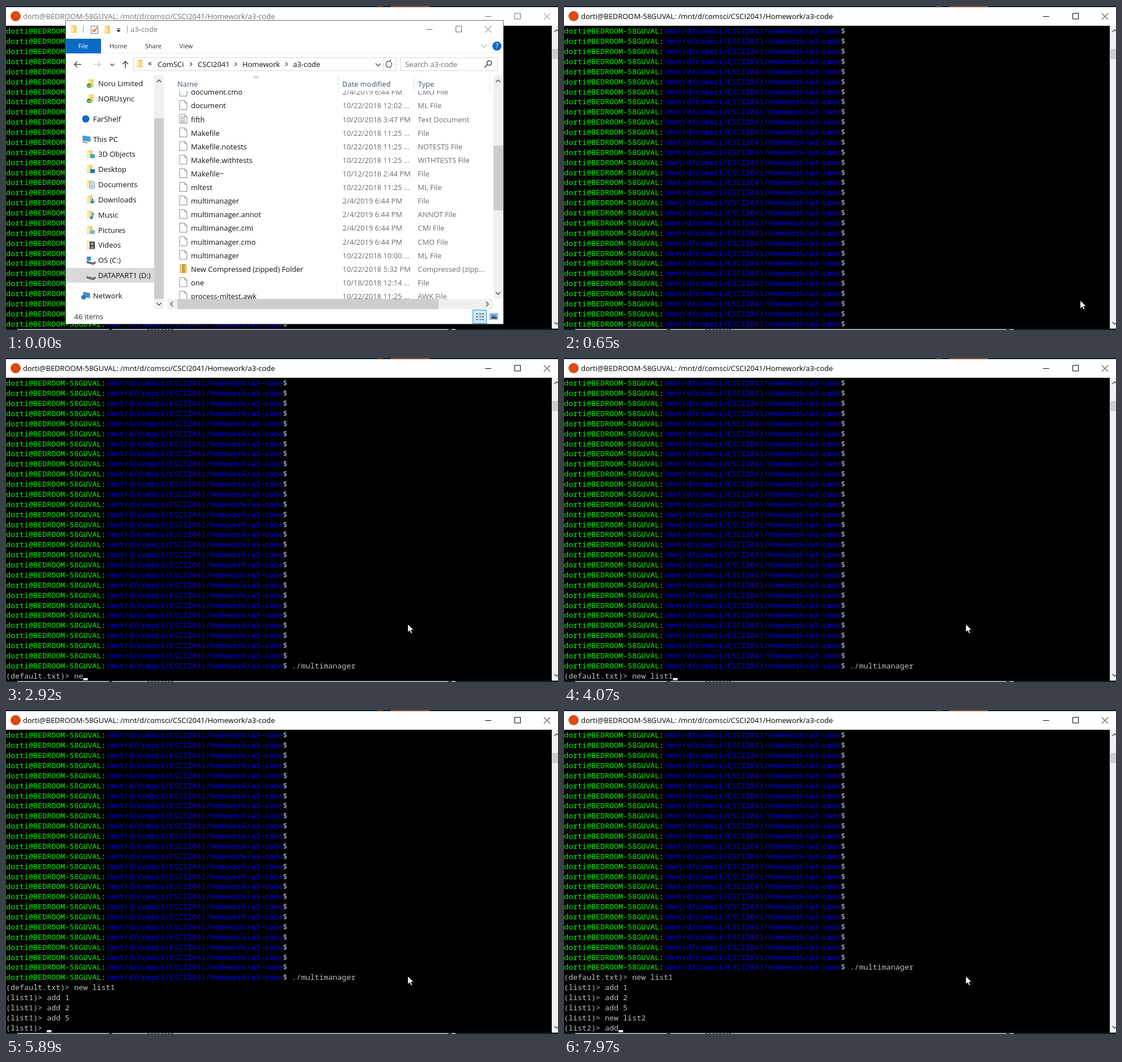
Write an HTML page that moves like this. It is 976 px wide and 574 px high and loops after 8000 ms.

```html
<!DOCTYPE html>
<html lang="en">
<head>
<meta charset="utf-8">
<title>Terminal session</title>
<style>
  html, body { margin: 0; width: 100%; height: 100%; overflow: hidden; background: #000; }
  svg { display: block; width: 100vw; height: 100vh; }
  text { font: 12.95px "Open Sans", "Noto Sans", sans-serif; white-space: pre; }
  #term text { font: 13.38px "Noto Sans Mono", "DejaVu Sans Mono", monospace; fill: #c0c0c0; }
  .user { fill: #0f0; }
  .path { fill: #00f; }
</style>
</head>
<body>
<svg id="stage" viewBox="0 0 976 574" preserveAspectRatio="none"></svg>
<script>
const LOOP = 8000;
const ROWS = 30, ROW_H = 17.87, COL_W = 8.03;
const USER = 'dorti@BEDROOM-58GUVAL';
const PATH = '/mnt/d/comsci/CSCI2041/Homework/a3-code';
const GRAY = '#6d6d6d';

// ---- drawing helpers ----
const rect = (x, y, w, h, fill, stroke = 'none') =>
  `<rect x="${x}" y="${y}" width="${w}" height="${h}" fill="${fill}" stroke="${stroke}"/>`;
const circle = (x, y, r, fill) => `<circle cx="${x}" cy="${y}" r="${r}" fill="${fill}"/>`;
const line = (d, stroke = '#444', width = 1, fill = 'none') =>
  `<path d="${d}" stroke="${stroke}" stroke-width="${width}" fill="${fill}"/>`;
const label = (x, mid, s, fill = '#111', size = 12.95, anchor = 'start') =>
  `<text x="${x}" y="${mid + size * 0.36}" fill="${fill}" text-anchor="${anchor}" style="font-size:${size}px">${s}</text>`;
const chevron = (x, y, dir, r = 4, color = '#505050', width = 1.5) =>
  `<g transform="translate(${x} ${y}) rotate(${{ up: 0, right: 90, down: 180, left: 270 }[dir]})">` +
  line(`M${-r} ${r / 2}L0 ${-r / 2}L${r} ${r / 2}`, color, width) + '</g>';
const buttons = (x, y, color) =>
  line(`M${x} ${y + .5}h11`, color) + rect(x + 52.5, y - 5, 10, 10, 'none', color) +
  line(`M${x + 104} ${y - 5}l11 11m0 -11l-11 11`, color);
const folder = (x, y) =>
  rect(x - 5, y - 7, 10, 14, '#f6d06f') + line(`M${x - 5} ${y - 7}l5 3v11l-5 -2z`, 'none', 0, '#ffe9a2');
const page = (x, y) =>
  line(`M${x - 6} ${y - 8}h9l4 4v12h-13zM${x + 3} ${y - 8}v4h4`, '#858585', 1, '#fff');

// ---- sidebar icons ----
const icons = {
  synced: (x, y) => folder(x, y) + circle(x - 3, y + 4, 4, '#3a9a2c') + line(`M${x - 5} ${y + 4}l2 2l3 -4`, '#fff'),
  dot: (x, y) => circle(x, y, 6.5, '#1268c8'),
  pc: (x, y) => line(`M${x - 5} ${y - 6}l13 2v8l-13 -2z`, '#5b7c96', 1, '#3aa5e8') + line(`M${x - 6} ${y + 4}l9 3`, '#8ba0ad', 2),
  accent: color => (x, y) => folder(x - 2, y) + rect(x - 1, y, 8, 7, color),
  drive: (x, y) => line(`M${x - 7} ${y + 2}l11 3l4 -2v3l-4 2l-11 -3z`, '#555', 1, '#777'),
  system: (x, y) => rect(x - 7, y - 6, 7, 7, '#2492dc') + icons.drive(x, y),
  doc: (x, y) => folder(x - 2, y) + rect(x - 1.5, y - 4, 8, 11, '#fff', '#6c8ba5') + line(`M${x} ${y - 1}h5m-5 3h5m-5 2h5`, '#3a87c8'),
  music: (x, y) => folder(x - 2, y) + circle(x + 1, y + 5, 2.5, '#1a86d8') + line(`M${x + 3} ${y + 5}v-8l3 3`, '#1a86d8', 1.5),
  down: (x, y) => folder(x - 2, y) + line(`M${x + 3} ${y - 2}v8m-3.500 -3.500l3.500 3.500l3.500 -3.500`, '#1a78d0', 2),
  film: (x, y) => folder(x - 2, y) + rect(x - 2, y - 6, 9, 13, '#3c3c3c') + rect(x, y - 4, 5, 4, '#8ab') + rect(x, y + 2, 5, 4, '#b87'),
  net: (x, y) => line(`M${x - 4} ${y - 6}l11 2v8l-11 -2z`, '#567', 1, '#3798dd') + circle(x - 4, y + 3, 4, '#3977b8')
};

const sidebar = [
  [137, 'Noru Limited', icons.synced, 1], [164, 'NORUsync', icons.synced, 1],
  [200, 'FarShelf', icons.dot, 0], [236, 'This PC', icons.pc, 0],
  [262.5, '3D Objects', icons.accent('#35a7d8'), 1], [289, 'Desktop', icons.accent('#1976c9'), 1],
  [316, 'Documents', icons.doc, 1], [343, 'Downloads', icons.down, 1],
  [370, 'Music', icons.music, 1], [397, 'Pictures', icons.accent('#7eb6d9'), 1],
  [423.5, 'Videos', icons.film, 1], [450, 'OS (C:)', icons.system, 1],
  [477, 'DATAPART1 (D:)', icons.drive, 1], [513, 'Network', icons.net, 0]
];

const BUILT = '2/4/2019 6:44 PM', EDITED = '10/22/2018 11:25 ...';
const files = [
  ['document.cmo', BUILT, 'CMO File'],
  ['document', '10/22/2018 12:02 ...', 'ML File'],
  ['fifth', '10/20/2018 3:47 PM', 'Text Document'],
  ['Makefile', EDITED, 'File'],
  ['Makefile.notests', EDITED, 'NOTESTS File'],
  ['Makefile.withtests', EDITED, 'WITHTESTS File'],
  ['Makefile~', '10/12/2018 2:44 PM', 'File'],
  ['mltest', EDITED, 'ML File'],
  ['multimanager', BUILT, 'File'],
  ['multimanager.annot', BUILT, 'ANNOT File'],
  ['multimanager.cmi', BUILT, 'CMI File'],
  ['multimanager.cmo', BUILT, 'CMO File'],
  ['multimanager', '10/22/2018 10:00 ...', 'ML File'],
  ['New Compressed (zipped) Folder', '10/22/2018 5:32 PM', 'Compressed (zipp...'],
  ['one', '10/18/2018 12:14 ...', 'File'],
  ['process-mltest.awk', EDITED, 'AWK File']
];

function fileRow([name, date, type], i) {
  const y = 152.6 + 24.12 * i;
  let icon = page(313, y - 1);
  if (type === 'Text Document') icon += line(`M309 ${y - 4}h8m-8 3h8m-8 3h8m-8 3h8`, '#777');
  if (type.startsWith('Compressed')) {
    icon = rect(307, y - 9, 13, 16, '#f3ca60') + rect(312, y - 9, 4, 16, '#9b8550') +
      line(`M314 ${y - 9}v16`, '#eee', 2).replace('/>', ' stroke-dasharray="1 2"/>');
  }
  return icon + label(327, y, name) + label(595, y, date, GRAY) + label(728, y, type, GRAY);
}

function explorer() {
  const crumbs = [[268, 'ComSCi'], [339, 'CSCI2041'], [418, 'Homework'], [507.5, 'a3-code']];
  return rect(105.5, 25.5, 774, 538, '#fff', '#6e6e6e') +
    // title bar and ribbon
    folder(120, 41) + line('M136.500 35v13M214.500 35v13', '#999') +
    rect(150.5, 35.5, 12, 13, '#fff', '#777') + line('M153 42l3 3l5 -7', '#d8562a', 2) +
    folder(179, 42) + line('M196 40.500h6M196 43l3 3l3 -3z', '#222', 1, '#222') +
    label(220, 41.5, 'a3-code', '#777') + buttons(743, 41, '#666') +
    rect(106, 58, 62, 26, '#0c6ac6') + label(136.5, 71, 'File', '#fff', 11, 'middle') +
    [[198.5, 'Home'], [260.5, 'Share'], [318.5, 'View']].map(([x, s]) => label(x, 71, s, '#333', 11, 'middle')).join('') +
    chevron(845, 71, 'down', 5, '#888', 1) + circle(868, 71, 8, '#0c6ac6') +
    label(868, 71, '?', '#fff', 12, 'middle') + line('M168 83.500h711', '#ececec') +
    // navigation row
    line('M133 103.500h-12m5 -5l-5 5l5 5', '#444', 1.5) + line('M155 103.500h12m-5 -5l5 5l-5 5', '#ccc', 1.5) +
    chevron(188, 104, 'down', 3.5) + line('M211 110v-12m-5 5l5 -5l5 5', '#444', 1.5) +
    rect(225.5, 91.5, 464, 23, '#fff', '#d9d9d9') + folder(236, 102) + label(251, 101, '«', '#222', 14) +
    crumbs.map(([x, s]) => label(x, 103, s)).join('') +
    [327, 406, 496].map(x => chevron(x, 103, 'right', 3.5, '#444', 1.2)).join('') +
    chevron(658, 104, 'down', 4.5) + line('M667.500 92v23', '#d9d9d9') +
    line('M681 100a5 5.500 0 1 1 -5 -2h4m0 -3v4', '#555', 1.4) +
    rect(697.5, 91.5, 171, 23, '#fff', '#d9d9d9') + label(706, 103.5, 'Search a3-code', GRAY) +
    line('M851 104l-5 5m4.500 -8a4 4 0 1 1 8 0a4 4 0 1 1 -8 0', '#444', 1.6) +
    // sidebar
    rect(106, 464, 156, 26, '#d9d9d9') +
    sidebar.map(([y, s, icon, deep]) => icon(deep ? 150 : 141, y) + label(deep ? 163 : 154, y, s)).join('') +
    rect(262, 123, 17, 414, '#f0f0f0') + rect(262, 199, 17, 320, '#cdcdcd') +
    chevron(270.5, 133, 'up') + chevron(270.5, 528, 'down') +
    // file list
    line('M587.500 124v28M721.500 124v28M855.500 124v28', '#e2e2e2') + chevron(442, 126, 'up', 4, '#777', 1) +
    label(303, 138, 'Name', '#44546a') + label(594.5, 138, 'Date modified', '#44546a') + label(728.5, 138, 'Type', '#44546a') +
    `<clipPath id="list"><path d="M285 150h576v369h-576z"/></clipPath><g clip-path="url(#list)">${files.map(fileRow).join('')}</g>` +
    rect(862, 123, 17, 396, '#f0f0f0') + rect(862, 247, 17, 115, '#cdcdcd') +
    chevron(870, 133, 'up') + chevron(870, 509, 'down') +
    rect(285, 519, 576, 18, '#f0f0f0') + rect(303, 519, 462, 18, '#cdcdcd') +
    chevron(293, 528, 'left') + chevron(851, 528, 'right') +
    // status bar
    label(120.5, 550.5, '46 items', '#333') + rect(825.5, 538.5, 24, 24, '#cce8f8', '#2a9ad4') +
    line('M831 545.500h4m2 0h3m1 0h4M831 550.500h4m2 0h3m1 0h4M831 555.500h4m2 0h3m1 0h4', '#556', 1.4) +
    rect(855.5, 544.5, 14, 11, '#fff', '#888') + rect(857, 546, 11, 8, '#4a9bd8') + line('M857 554l4 -4l3 2l4 -1v3z', 'none', 0, '#234');
}

const backdrop = rect(0, 0, 976, 574, '#0b1b28') + rect(680, 0, 70, 1.5, '#a8561f') + rect(657, 0, 10, 1, '#a8561f') +
  rect(20, 572.5, 775, 1.5, '#c9ced2') + line('M250 573.500h48', '#333', 1).replace('/>', ' stroke-dasharray="4 2"/>') +
  rect(182, 572, 6, 2, '#333') + rect(782, 572, 6, 2, '#333');

const terminal = rect(0, 2, 976, 33, '#fff') + circle(17, 18, 9, '#dd4814') +
  '<g id="caption"></g>' + rect(0, 35, 965, 536.5, '#000') +
  `<g id="term">${Array.from({ length: ROWS }, (_, i) => `<text x="0" y="${49.4 + i * ROW_H}"></text>`).join('')}</g>` +
  rect(0, 567, 8, 4, '#fff').replace('<rect', '<rect id="caret"') +
  rect(965, 35, 11, 536.5, '#f0f0f0') + rect(966, 76, 10, 18, '#cdcdcd') +
  chevron(973.5, 44, 'up') + chevron(973.5, 562, 'down');

const pointer = '<path id="pointer" d="M0 0v14.500l3.400 -3.200l2.300 5.300l2.300 -1l-2.300 -5.200h4.600z" fill="#fff" stroke="#000" stroke-width=".7"/>';

const stage = document.getElementById('stage');
stage.innerHTML = backdrop + terminal + `<g id="explorer">${explorer()}</g>` + pointer;
const [caption, term, caret, windowLayer, arrow] =
  ['caption', 'term', 'caret', 'explorer', 'pointer'].map(id => document.getElementById(id));

// ---- timeline ----
// Each burst: start, end, and the keys that land at each even step between them.
const bursts = [
  [1410, 1950, ['.', '/', 'm', 'ul', 't', 'im', 'an']],
  [2030, 2410, ['a', 'ge', 'r', '\n']],
  [2660, 3350, ['n', 'e', 'w', ' ']],
  [3620, 4070, ['l', 'i', 's', 't', '1']],
  [4150, 4610, ['\n', 'a', 'd', 'd', ' 1']],
  [4750, 5650, ['\n', 'a', 'd', 'd', ' ', '2', '\n', 'a', 'd', 'd ']],
  [5810, 5890, ['5', '\n']],
  [6030, 6450, ['n', 'e', 'w', ' ']],
  [6970, 7970, ['l', 'i', 's', 't', '2', '\n', 'a', 'd', 'd']]
];
const keys = bursts.flatMap(([from, to, list]) =>
  list.map((key, i) => [from + (to - from) * i / (list.length - 1), key]));

const PROMPT = USER + ':' + PATH + '$ ';
const paint = s => s.replace('>', '&gt;')
  .replace(USER, `<tspan class="user">${USER}</tspan>`)
  .replace(PATH, `<tspan class="path">${PATH}</tspan>`);

function screen(t) {
  const lines = Array(ROWS).fill(PROMPT);
  let list = 'default.txt', typed = '';
  const typedAll = keys.filter(([at]) => at <= t + 0.5).map(k => k[1]).join('');
  for (const c of typedAll) {
    if (c === '\n') {
      if (typed.startsWith('new ')) list = typed.slice(4);
      lines.push(`(${list})> `);
      typed = '';
    } else {
      typed += c;
      lines[lines.length - 1] += c;
    }
  }
  return lines.slice(-ROWS);
}

function pointerAt(t) {
  if (t < 430) return [926, 545];
  const step = t < 730 ? 0 : Math.min(6, 1 + Math.floor((t - 730) / 104));
  const k = step / 6, ease = k * k * (3 - 2 * k);
  return [912.8 - 202.4 * ease, 521.5 - 50 * ease];
}

let shown = '';
function frame(now) {
  const t = now % LOOP;
  const focused = t >= 650;
  const lines = screen(t);
  const [x, y] = pointerAt(t);
  const key = lines.join('\n') + focused;
  if (key !== shown) {
    shown = key;
    [...term.children].forEach((row, i) => { row.innerHTML = paint(lines[i]); });
    const color = focused ? '#000' : '#707070';
    caption.innerHTML = label(30, 18.5, `${USER}: ${PATH}`, color) + buttons(847, 18, color);
  }
  windowLayer.style.display = focused ? 'none' : '';
  caret.setAttribute('x', lines[ROWS - 1].length * COL_W);
  caret.style.display = t >= 1250 && !(t >= 2550 && t < 2660) ? '' : 'none';
  arrow.style.display = t >= 350 ? '' : 'none';
  arrow.setAttribute('transform', `translate(${x} ${y})`);
  requestAnimationFrame(frame);
}
const start = performance.now();
const tick = frame;
requestAnimationFrame(function begin() { tick(performance.now() - start); });
</script>
</body>
</html>
```
